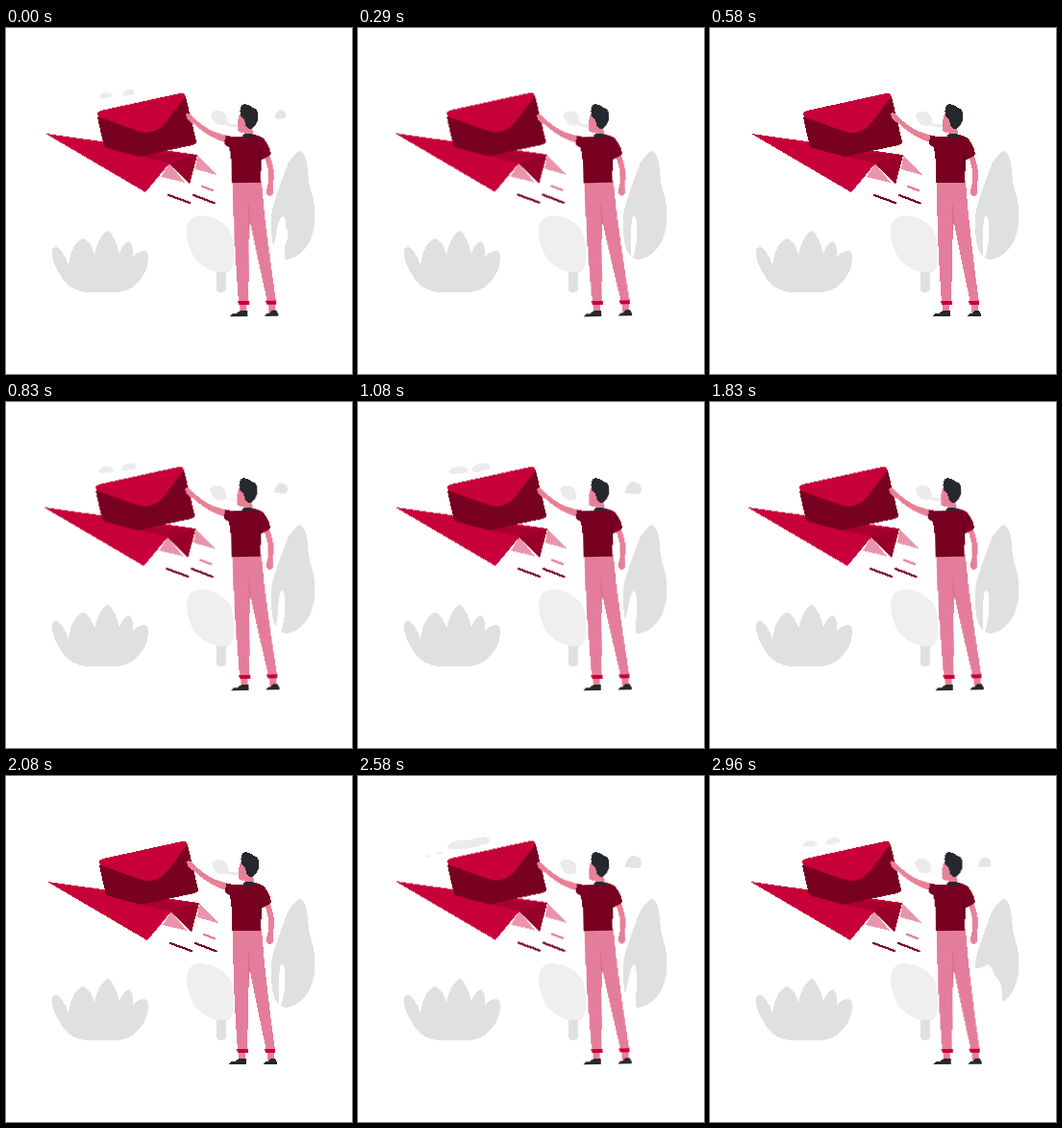
Recreate the animation shown at these times as an HTML page without scripts. Size 360 px wide and 360 px high, loop 3000 ms.

```html
<!DOCTYPE html>
<html lang="en">
<head>
<meta charset="utf-8">
<title>Sending mail</title>
<style>
html, body { margin: 0; width: 100%; height: 100%; overflow: hidden; background: #fff; }
svg { display: block; width: 100vw; height: 100vh; shape-rendering: crispEdges; }

.red { fill: #c80039; }
.shade { fill: #a8002f; }
.wine { fill: #780020; }
.pink { fill: #e47d9b; }
.blush { fill: #e994ad; }
.skin { fill: #e88098; }
.ink { fill: #25282d; }
.grey { fill: #e0e0e0; }
.pale { fill: #ebebeb; }
.faint { fill: #efefef; }

/* plane and man share one sway */
.plane, .man { animation: 375ms ease-in-out -535ms infinite alternate; }
.plane { animation-name: glide; }
.man { animation-name: lean; transform-origin: 250px 175px; }
@keyframes glide { from { transform: translate(-5px, -.6px); } to { transform: none; } }
@keyframes lean { from { transform: rotate(-1.6deg); } to { transform: none; } }

.cloud { transform-box: fill-box; transform-origin: 50% 20%; animation: puff 1500ms linear infinite; }
.right { transform-origin: 30% 60%; }
.mid { animation-name: drift; }
.tail { animation: tail 1500ms linear infinite; }
.wisp { animation: wisp 3000ms linear infinite; }
@keyframes puff {
  0% { transform: scale(.7); }
  2.7% { transform: scale(.4); }
  7%, 42% { transform: scale(0); }
  58%, 74% { transform: scale(1); }
  97% { transform: scale(.8); }
  100% { transform: scale(.7); }
}
@keyframes drift {
  0%, 100% { transform: translate(0, 0); }
  39% { transform: translate(1px, 1px); }
  72% { transform: translate(-3px, 1px); }
}
@keyframes tail {
  0%, 45% { opacity: 1; }
  60%, 97% { opacity: 0; }
  100% { opacity: 1; }
}
@keyframes wisp {
  0%, 80% { opacity: 0; }
  84%, 87% { opacity: 1; }
  91%, 100% { opacity: 0; }
}

.notch { fill: #fff; animation: notch 1500ms linear infinite; }
@keyframes notch {
  0%, 100% { d: path("M280 222Q283 196 288 196Q292 198 291 207Q296 214 291 224Q288 232 291 242L291 244L272 244Z"); }
  2.7%, 97% { d: path("M276 200Q283 200 289 196Q294 199 296 208Q303 213 303 220Q305 228 304 234L316 234L316 244L272 244Z"); }
  12%, 45% { d: path("M284 222Q284 197 287 195Q291 197 290 212Q291 218 288 232Q286 238 286 241L286 241L284 238Z"); }
  72% { d: path("M281 214Q284 197 287 196Q290 198 290 210Q291 218 289 228Q288 236 290 242L290 244L274 244Z"); }
}
</style>
</head>
<body>
<svg viewBox="0 0 360 360">
  <g class="pale">
    <path class="cloud" d="M94 73Q96 68 104 67Q113 67 114 71Q112 75 105 74Q98 77 94 73Z"/>
    <path class="cloud" d="M118 71Q121 64 129 63.500Q137 63 137 68Q136 72 130 71Q124 75 118 71Z"/>
    <path class="wisp" d="M68 84l7-2v1.500zM80 81q4-3 9-2q-3 3-9 2zM92 75q9-8 24-8q10-5 20-3q-4 9-16 10q-14 4-28 1z"/>
    <path class="cloud right" fill="#e4e4e4" d="M278 95Q279 86 285 83Q294 83 295 90Q295 97 288 96Z"/>
    <path class="cloud mid" d="M213 90Q216 85 223 86Q231 88 230 100Q224 102 219 100Q215 97 213 90Z"/>
    <path class="tail" d="M229 98Q235 101 243 100Q242 105 234 103L229 101Z"/>
  </g>

  <path class="grey" d="M57 258Q47 243 48 231Q51 225 56 230Q62 237 65 247Q68 224 80 219Q89 222 92 236Q97 215 106 211Q114 217 118 235Q122 223 128 222Q133 226 132 238Q140 230 147 233Q151 251 135 267Q126 275 113 275H85Q67 274 57 258Z"/>

  <path class="faint" d="M188 211Q188 196 202 195Q221 196 231 208Q238 218 237 238Q237 254 228 255Q209 254 197 240Q188 227 188 211Z"/>
  <path class="grey" d="M219 254H229V273Q224 277 219 273Z"/>
  <path class="grey" d="M306 128Q313 131 314 150Q315 165 320 179Q324 200 318 217Q311 237 292 241Q279 240 277 220Q274 202 278 184Q284 166 291 147Q297 131 306 128Z"/>
  <path class="notch"/>

  <g class="plane">
    <path class="blush" d="M201 133L221 153L199 147ZM172 141L163 155L188 161Z"/>
    <path class="red" d="M43 110L201 132L172 141L147 171Z"/>
    <path class="shade" d="M112 127L201 132L172 141Z"/>
    <path fill="#960029" d="M172 141L201 132L193 163Z"/>
    <path class="wine" d="M101 90L184 69Q188 68 189 72L200 118Q200 121 196 122L140 134L104 124L97 93Z"/>
    <path class="red" d="M97 90Q97 87 101 86L183 68Q189 67 188 72L167 100Q155 113 138 107L99 93Z"/>
    <g fill="none" stroke="#780020" stroke-width="2.200" stroke-linecap="round">
      <path d="M171 174L193 182M197 174L219 182.500"/>
      <path stroke="#e47d9b" d="M206 165L217 169"/>
    </g>
  </g>

  <g class="man">
    <path class="skin" d="M232 112Q217 109 206 101L195 92Q193 88 189 88Q187 91 191 96Q197 99 203 105Q215 115 230 119Z"/>
    <path class="skin" d="M268 132Q275 147 273 161Q271 168 271 173Q274 177 278 173Q279 168 278 163Q281 148 274 130Z"/>
    <path class="skin" d="M244 89Q241 98 242 106Q244 110 248 108L247 114H258L257 100L254 90Z"/>
    <path class="ink" d="M245 91Q243 81 249 79Q255 80 258 83Q264 85 263 91Q264 99 257 105Q251 106 250 100L249 95Q247 94 245 91Z"/>
    <path class="skin" d="M242 288H249V296H242ZM272 288H279V296H272Z"/>
    <path class="pink" d="M236 159H266Q269 205 280 286H271Q261 240 253 198Q252 242 251 286H241Q236 220 236 159Z"/>
    <path fill="#d96e8d" d="M252 177L254 200L252 215Z"/>
    <path class="red" d="M240 284H252V288H241ZM269 284H280V288H270Z"/>
    <path class="ink" d="M232 300Q232 297 238 297L243 294H250V300ZM268 300Q268 297 273 297L275 294H280Q282 297 282 300Z"/>
    <path class="wine" d="M229 112Q245 114 258 111Q267 112 270 117Q275 124 276 131Q272 136 266 137L265 161H235Q236 141 233 124L228 121Z"/>
    <path fill="#5c0018" d="M265 124Q264 132 266 137L265 148Q262 137 265 124Z"/>
    <path class="ink" d="M246 112Q252 108 259 111L257 114Q251 116 246 112Z"/>
  </g>
</svg>
</body>
</html>
```
